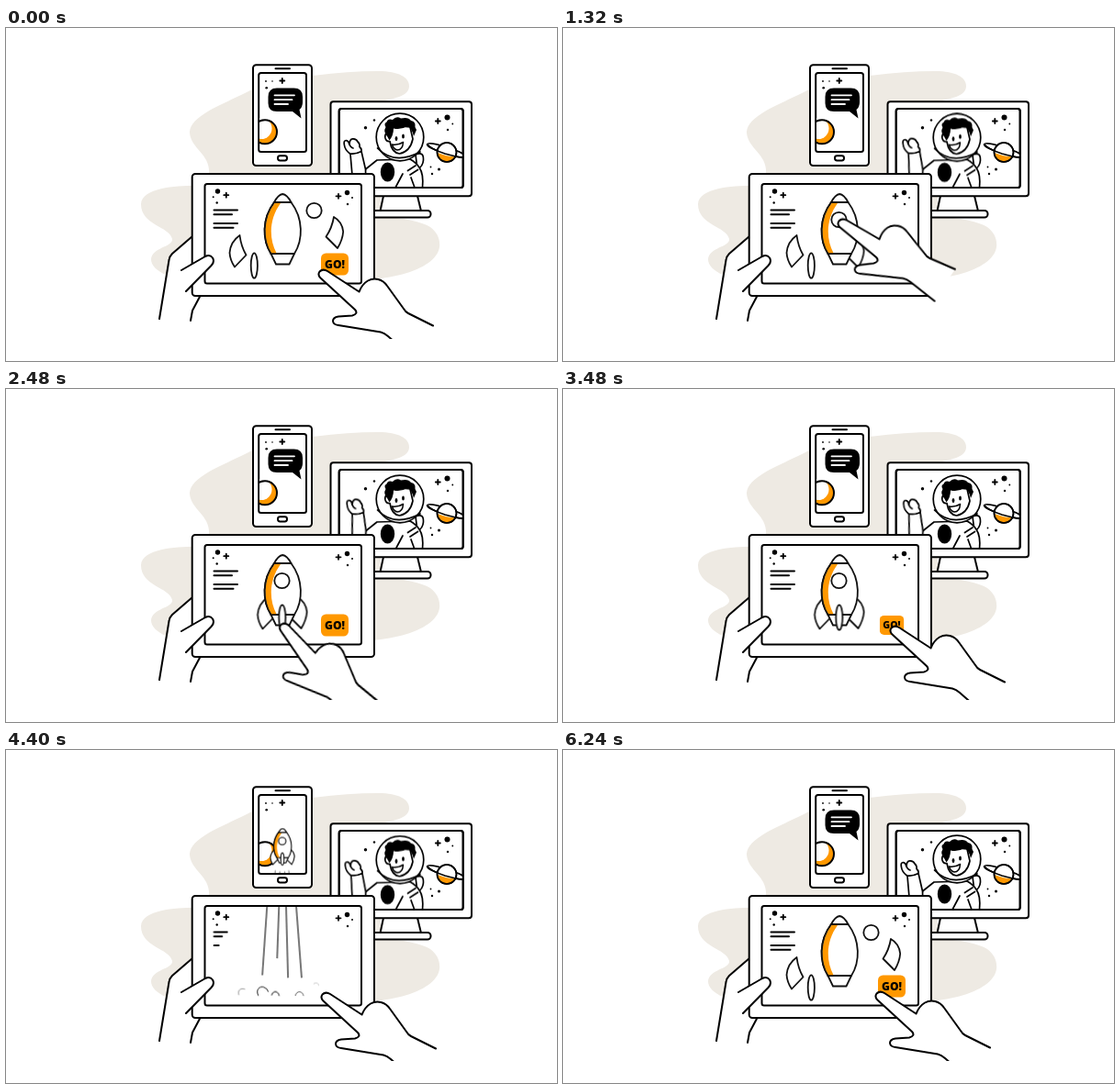
Animation, 600 px wide and 363 px high, one loop 6280 ms. Source, as an HTML page without scripts:

```html
<!DOCTYPE html>
<html lang="en">
<head>
<meta charset="utf-8">
<title>Build and launch</title>
<style>
html, body { margin: 0; width: 100%; height: 100%; overflow: hidden; background: #fff; }
svg { display: block; width: 100vw; height: 100vh; }
.ink { fill: #fff; stroke: #000; stroke-width: 2; stroke-linecap: round; stroke-linejoin: round; }
.line { fill: none; }
.solid { fill: #000; stroke: none; }
.orange { fill: #ff9800; stroke: none; }
.white { fill: #fff; stroke: none; }
.thin { stroke: #111; stroke-width: 1.8; }
.go { font: 800 12px "Open Sans", "Noto Sans", sans-serif; text-anchor: middle; }

.hand, .finR, .finL, .port, .jet, .ship, .pop, .button, .bubble, .mini,
.text path, .trail path, .puffs path, .body {
  animation: 6280ms linear infinite;
}

/* the pointing hand, turned about its fingertip */
.hand { transform-origin: 341px 267px; animation-name: hand; animation-timing-function: ease-in-out; }
@keyframes hand {
  0%, .6% { transform: none; }
  5.1%, 5.8% { transform: translate(13px, -37px) rotate(10deg); }
  10.2%, 10.8% { transform: translate(-26.5px, -16px) rotate(10deg); }
  15.3%, 16% { transform: translate(-6px, -65px) rotate(4deg); }
  20.4%, 21.2% { transform: translate(-41px, -55px) rotate(-3deg); }
  25.5%, 26.2% { transform: translate(-88px, -21px) rotate(4deg); }
  30.6%, 31.2% { transform: translate(-57.5px, -20px) rotate(8deg); }
  35%, 35.7% { transform: translate(-72.5px, 1px) rotate(13deg); }
  39.2%, 41.4% { transform: translate(-42px, -9px) rotate(13deg); }
  51%, 62.1% { transform: translate(16px, -5px); }
  70% { transform: translate(3px, 1px); }
  73%, 100% { transform: none; }
}

/* rocket parts follow the fingertip, then go back while out of view */
.finR { animation-name: finR; animation-timing-function: ease-in-out; }
.port { animation-name: port; animation-timing-function: ease-in-out; }
.finL { animation-name: finL; animation-timing-function: ease-in-out; }
.jet { animation-name: jet; animation-timing-function: ease-in-out; }
@keyframes finR {
  0%, 5.8% { transform: none; }
  10.2%, 75% { transform: translate(-39.5px, 21px); }
  75.01%, 100% { transform: none; }
}
@keyframes port {
  0%, 16% { transform: none; }
  20.4%, 75% { transform: translate(-35px, 10px); }
  75.01%, 100% { transform: none; }
}
@keyframes finL {
  0%, 26.2% { transform: none; }
  30.6%, 75% { transform: translate(30.5px, 1px); }
  75.01%, 100% { transform: none; }
}
@keyframes jet {
  0%, 35.7% { transform: none; }
  39.2%, 75% { transform: translate(30.5px, -10px); }
  75.01%, 100% { transform: none; }
}
.ship { animation-name: ship; }
@keyframes ship {
  0%, 58% { transform: none; animation-timing-function: ease-in; }
  65%, 75% { transform: translateY(-112px); }
  75.01%, 100% { transform: none; }
}
.pop { transform-box: fill-box; transform-origin: center; animation-name: pop; }
@keyframes pop {
  0%, 66% { transform: none; }
  66.01%, 91% { transform: scale(0); animation-timing-function: ease-out; }
  97%, 100% { transform: none; }
}

.button { transform-origin: 358px 257px; animation-name: button; animation-timing-function: ease-in-out; }
@keyframes button {
  0%, 52.5% { transform: none; }
  55%, 56% { transform: scale(.88); }
  58.5%, 61% { transform: none; }
  66%, 90% { transform: scale(0); }
  95% { transform: scale(1.06); }
  97.5%, 100% { transform: none; }
}
.bubble { transform-origin: 319px 96px; animation-name: bubble; animation-timing-function: ease-in-out; }
@keyframes bubble {
  0%, 56.5% { transform: none; }
  58% { transform: scale(1.06); }
  61%, 88% { transform: scale(0); }
  93% { transform: scale(1.06); }
  95%, 100% { transform: none; }
}
.mini { animation-name: mini; }
@keyframes mini {
  0%, 66% { transform: translateY(52px); }
  70.06% { transform: none; }
  71.3% { transform: translateY(-32px); }
  73.8%, 75% { transform: translateY(-110px); }
  75.01%, 100% { transform: translateY(52px); }
}

.text path { transform-origin: 226px 0; animation-name: text; }
.text :nth-child(2) { animation-delay: -30ms; }
.text :nth-child(3) { animation-delay: -105ms; }
.text :nth-child(4) { animation-delay: -180ms; }
@keyframes text {
  0%, 68.1% { transform: none; opacity: 1; }
  72.8% { transform: scaleX(.02); opacity: 1; }
  72.9%, 88% { transform: scaleX(0); opacity: 0; }
  88.1% { transform: scaleX(.02); opacity: 1; }
  95%, 100% { transform: none; opacity: 1; }
}

/* streaks are drawn upwards, then wiped from the bottom */
.trail path { stroke: #777; stroke-dasharray: 100 300; stroke-linecap: butt; animation-name: trail; }
.trail :nth-child(2) { animation-delay: -75ms; }
.trail :nth-child(3), .trail :nth-child(4) { animation-delay: -6268ms; }
@keyframes trail {
  0%, 59.5% { stroke-dashoffset: 100; }
  64.5%, 69% { stroke-dashoffset: 0; }
  75%, 76% { stroke-dashoffset: -100; }
  76.01%, 100% { stroke-dashoffset: 100; }
}
.puffs path { transform-box: fill-box; transform-origin: 50% 70%; animation-name: puff; }
.puffs :nth-child(2) { animation-delay: -120ms; }
.puffs :nth-child(3) { animation-delay: -160ms; }
.puffs :nth-child(4) { animation-delay: -50ms; }
.puffs :nth-child(5) { animation-delay: -6220ms; }
@keyframes puff {
  0%, 66.5% { transform: scale(0); opacity: 0; }
  71.5% { opacity: 1; }
  77%, 81.6% { transform: none; opacity: 1; }
  89%, 100% { transform: scale(.9); opacity: 0; }
}

.arm { transform-origin: 386px 160px; animation: wave 523.333ms ease-in-out infinite alternate; }
@keyframes wave { to { transform: rotate(6deg); } }
.body { animation-name: sway; animation-timing-function: ease-in-out; }
@keyframes sway { 50% { transform: translateY(1px); } }
</style>
</head>
<body>
<svg viewBox="0 0 600 363">
  <defs>
    <clipPath id="phone"><rect x="276" y="50" width="50" height="84"/></clipPath>
    <clipPath id="monitor"><rect x="363.5" y="89" width="133.5" height="84"/></clipPath>
    <clipPath id="tablet"><rect x="217.5" y="171" width="168.5" height="106.5"/></clipPath>
    <clipPath id="floor"><rect width="600" height="338.5"/></clipPath>
    <clipPath id="disc"><circle cx="480" cy="135.5" r="10"/></clipPath>
    <path id="plus" class="line" stroke-width="1.8" d="M-2.5 0H2.5M0-2.5V2.5"/>
    <path id="right" d="M357 206Q366 211 367.2 222Q366.5 231 361 240L348.5 227.5Q355 218 357 206Z"/>
    <path id="left" d="M254.5 226Q244.5 233 243.5 245Q244 253 249 260.5L261.5 247.5Q256 238 254.5 226Z"/>
    <ellipse id="flame" cx="270.3" cy="259" rx="3.6" ry="13.7"/>
    <circle id="window" cx="335.5" cy="199" r="8.2"/>
    <g id="hull">
      <path d="M288.5 246L294 257.5H308.5L314 246Z"/>
      <path d="M292 190C278.5 208 279 231 288.5 246H314C323.5 231 324 208 310.5 190Z"/>
      <path class="orange" d="M292.5 191C279.5 208 280 231 289 245.3H294.5C286 229 286.5 208 299 191Z"/>
      <path class="line" d="M292 190C278.5 208 279 231 288.5 246"/>
      <path d="M292 190Q296.5 181.5 301.2 181Q306 181.5 310.5 190Z"/>
    </g>
  </defs>

  <path fill="#eeeae3" d="M405 47C428 47 439 54 439 63C439 73 428 76 408 80V206C435 207 452 211 462 217C470 223 473 231 472 239C469 258 437 271 398 274L210 282C190 275 158 268 158 252C159 239 182 239 181 230C178 216 147 215 147 192C148 174 185 172 205 172C222 170 224 156 218 144C213 134 200 126 200 113C202 94 240 82 268 67C310 53 362 47 405 47Z"/>

  <!-- phone -->
  <g class="ink">
    <rect x="269" y="40.3" width="64" height="109.7" rx="3.5"/>
    <rect x="275.2" y="49" width="51.8" height="86" rx="2.5"/>
    <path d="M293.5 44.3H309"/>
    <rect x="296" y="139.3" width="10" height="5.2" rx="2.4"/>
    <g clip-path="url(#phone)">
      <circle class="orange" cx="282" cy="113.3" r="13"/>
      <circle class="white" cx="278" cy="109.5" r="11.5"/>
      <circle class="line" cx="282" cy="113.3" r="13"/>
      <use href="#plus" x="300.8" y="57.5"/>
      <g class="solid">
        <circle cx="283" cy="58" r=".9"/><circle cx="290" cy="58" r=".8"/><circle cx="283.7" cy="65.3" r="1.3"/>
      </g>
      <g class="mini">
        <g transform="translate(301 86) scale(.49) translate(-301 -181)" stroke-width="2.2">
          <use href="#left" x="30.5" y="1"/>
          <use href="#right" x="-39.5" y="21"/>
          <use href="#hull"/>
          <use href="#window" x="-35" y="10"/>
          <use href="#flame" x="30.5" y="-10"/>
          <path class="line" stroke="#777" d="M285 275L283 304M295 277V294M306 277V304M315 275L318 304"/>
        </g>
      </g>
    </g>
    <g class="bubble">
      <path class="solid" d="M295 65.5H313.5Q323 65.5 323 75V81Q323 86 319.5 89L321.5 98.5L312 91H295Q285.5 91 285.5 82V75Q285.5 65.5 295 65.5Z"/>
      <path class="line" stroke="#fff" stroke-width="1.8" d="M292.5 73.3H314M292.5 78.2H311.5M292.5 83H307"/>
    </g>
  </g>

  <!-- monitor -->
  <g class="ink">
    <path d="M411 183L407.5 199.5H452L448 183Z"/>
    <rect x="395" y="199" width="67.5" height="7.5" rx="3.5"/>
    <rect x="353.5" y="80.3" width="153.5" height="103" rx="3"/>
    <rect x="362.7" y="88" width="135" height="86" rx="2.5"/>
    <g clip-path="url(#monitor)">
      <g class="solid">
        <circle cx="480.5" cy="97.5" r="3"/><circle cx="486.3" cy="104.5" r=".9"/>
        <circle cx="481" cy="111" r="1.2"/><circle cx="462.5" cy="151.5" r=".9"/>
        <circle cx="471.5" cy="154" r="1.5"/><circle cx="464" cy="159" r="1.2"/>
        <circle cx="391.5" cy="108.7" r="1.7"/><circle cx="401" cy="100.5" r="1.2"/>
      </g>
      <use href="#plus" x="470.3" y="101.5"/>
      <g stroke-width="1.6">
        <ellipse cx="479.5" cy="133.5" rx="22" ry="3.6" transform="rotate(18 479.5 133.5)"/>
        <circle cx="480" cy="135.5" r="10.5"/>
        <path class="orange" clip-path="url(#disc)" d="M468 135Q480 140.5 493 140.5V148H468Z"/>
        <circle class="line" cx="480" cy="135.5" r="10.5"/>
        <path class="line" d="M459 127Q463 132 478 137Q493 141.5 500 140.5"/>
      </g>

      <g class="body" stroke-width="1.7">
        <path d="M446 138Q455 134 454.5 144Q454 151 448 154Z"/>
        <path d="M404 144L391.5 154L388 174H453.5Q455 159 450 152Q446 146 440 143Z"/>
        <path class="line" d="M432 159L424 174M441 163L445 174"/>
        <path class="line" d="M437.5 155.5L446 150M440 160L448.5 154.5"/>
        <ellipse class="solid" cx="415.5" cy="157" rx="7.7" ry="10.5"/>
        <circle cx="429" cy="119" r="25.8"/>
        <path class="line" d="M404.5 131Q423 150 451 135"/>
        <path d="M416 114Q412 115 413 120Q414 124 418 123.5Q420 136 428.5 137Q440 135 443 121L440 108L420 106Z"/>
        <path class="solid" d="M417.5 122.5L415 118Q410.500 113 413.5 108Q411 104 414.500 102.5Q416 98 421 100Q425 95.500 430 98.5Q438 96.500 441 101Q446.500 102 445.500 108L447 111L444 118Q441.5 108 437 107Q430 111.5 422 109.500Q422 117 417.5 122.5Z"/>
        <ellipse class="solid" cx="425" cy="120.5" rx="1.4" ry="2.5"/>
        <ellipse class="solid" cx="432.5" cy="118" rx="1.4" ry="2.5"/>
        <path stroke-width="1.5" d="M420.5 127Q427 128 432.5 124.5Q432 133 426 133Q422 132 420.5 127Z"/>
      </g>
      <g class="arm" stroke-width="1.7">
        <path d="M375 137.5L378 172H392L391.5 154L387 134.5Z"/>
        <path d="M374.500 137Q369 133 368.3 127Q367.5 122.5 370.5 122.5Q373 123 374 127Q374 121 377.5 120.800Q381.500 120.500 383 124Q385.500 126 385 129.5Q387.500 131.500 387 134.5Q380 138 374.5 137Z"/>
        <path class="line" d="M374 127Q375.5 130.5 378 131"/>
      </g>
    </g>
    <rect class="line" x="362.7" y="88" width="135" height="86" rx="2.5"/>
  </g>

  <!-- tablet and the hand that holds it -->
  <path class="white" d="M203 227L181 246Q178 249 177.5 253L167 317L201 319L203 308L212 292Z"/>
  <path class="ink line" d="M203 227L181 246Q178 249 177.5 253L167 317M201 319L203 308L212 291"/>
  <g class="ink">
    <rect x="202.7" y="159" width="198.3" height="133" rx="3.5"/>
    <rect x="216.5" y="170" width="170.5" height="108.5" rx="2.5"/>
    <g class="solid">
      <circle cx="230.5" cy="178" r="2.7"/><circle cx="225.7" cy="184.3" r="1"/><circle cx="229.7" cy="190.5" r="1.2"/>
      <circle cx="371.5" cy="179.5" r="2.7"/><circle cx="377" cy="185" r="1"/><circle cx="372" cy="192" r="1.2"/>
    </g>
    <use href="#plus" x="239.8" y="182.2"/>
    <use href="#plus" x="362" y="183.3"/>
    <g class="text line">
      <path d="M226.5 198.5H252"/><path d="M226.5 203.3H246"/>
      <path d="M226.5 213H252"/><path d="M226.5 217.8H247.5"/>
    </g>

    <g clip-path="url(#tablet)">
      <g class="trail line">
        <path pathLength="100" d="M278 262L284.3 170"/>
        <path pathLength="100" d="M294 262L297.3 170"/>
        <path pathLength="100" d="M307.5 262L305 170"/>
        <path pathLength="100" d="M323 262L316 170"/>
      </g>
      <g class="puffs line" stroke-width="1.7">
        <path d="M247.5 270.5C244 258 250 248 266.5 252.5"/>
        <path d="M270 270C264 257 274 250 282 253Q290 256 291 262"/>
        <path d="M286.5 267.5C288 259 299 259 300.3 268.5"/>
        <path d="M309 269C311 256 328 256 330 269.5"/>
        <path d="M327 252.5C335 244 348 248 348.5 259"/>
      </g>
      <g class="ship thin">
        <g class="finL"><use class="pop" href="#left"/></g>
        <g class="finR"><use class="pop" href="#right"/></g>
        <use class="pop" href="#hull"/>
        <g class="port"><use class="pop" href="#window"/></g>
        <g class="jet"><use class="pop" href="#flame"/></g>
      </g>
      <g class="button">
        <rect class="orange" x="343" y="245.5" width="30" height="24" rx="5.5"/>
        <text class="solid go" x="358" y="262">GO!</text>
      </g>
    </g>
    <path d="M191 264L217 249Q222 246.5 225 250.5Q227.5 255 223.5 259L196 287"/>
  </g>

  <!-- pointing hand -->
  <g clip-path="url(#floor)">
    <path class="ink hand" d="M465 324.5L438 311Q435 309.5 433 306L415 281C410 273.500 401 271.5 394 275.5Q388 279 384.5 287.500L350 265Q345 262 341.5 265.5Q339 269 342.5 272.5L380 307Q384 311.5 377 313.5L362 314.5Q356 315.5 356 319.5Q356.5 323.5 362 324L408 331.5Q412 332.500 416 336L441 358"/>
  </g>
</svg>
</body>
</html>
```
